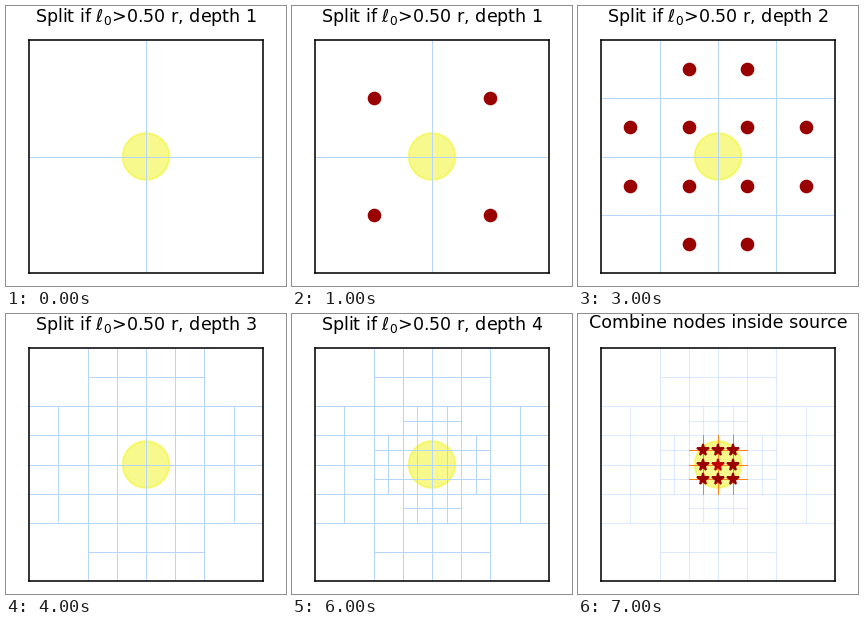
Animation, 280 px wide and 280 px high, one loop 8000 ms. Source, as a matplotlib script:

```python
import math

import matplotlib.pyplot as plt
from matplotlib.animation import FuncAnimation
from matplotlib.patches import Circle

SIZE, DPI = 280, 140
CX, CY, HALF = 140, 150.5, 350 / 3  # plot centre and half width in pixels
RATIO = 0.5
GRID, DARK, ORANGE = "#b5d5ff", "#990000", "#ff7f0e"
YELLOW = (0.94, 0.96, 0.1)

fig = plt.figure(figsize=(SIZE / DPI, SIZE / DPI), dpi=DPI, facecolor="white")
ax = fig.add_axes([(CX - HALF) / SIZE, 1 - (CY + HALF) / SIZE,
                   2 * HALF / SIZE, 2 * HALF / SIZE])
title = fig.text(0.5, 0.9, "", ha="center", va="baseline", fontsize=9)


def needs_split(cell):
    x, y, size = cell
    return size > RATIO * math.hypot(x, y)


def children(cell):
    x, y, size = cell
    q = size / 4
    return [(x + i * q, y + j * q, size / 2) for i in (-1, 1) for j in (-1, 1)]


def build_levels(depth):
    """Cells that are split at each level of the tree."""
    levels = [[(0, 0, 2)]]
    for _ in range(depth - 1):
        new = [kid for cell in levels[-1] for kid in children(cell)]
        levels.append([c for c in new if needs_split(c)])
    return levels


LEVELS = build_levels(4)


def draw_grid(depth, alpha=1):
    for level in LEVELS[:depth]:
        for x, y, size in level:
            h = size / 2
            style = dict(color=GRID, lw=0.5, alpha=alpha, solid_capstyle="butt")
            ax.plot([x - h, x + h], [y, y], **style)
            ax.plot([x, x], [y - h, y + h], **style)


def draw_combined():
    steps = (-0.125, 0, 0.125)
    for s in steps:
        ax.plot([-0.25, 0.25], [s, s], color=ORANGE, lw=0.5)
        ax.plot([s, s], [-0.25, 0.25], color=ORANGE, lw=0.5)
    for x in steps:
        for y in steps:
            ax.plot(x, y, "*", color=DARK if x or y else "#c00000")


def update(i):
    ax.clear()
    ax.set(xlim=(-1, 1), ylim=(-1, 1), xticks=[], yticks=[])
    ax.add_patch(Circle((0, 0), 0.2, color=YELLOW, alpha=0.5))
    if i == 7:
        draw_grid(4, 0.5)
        draw_combined()
        title.set_text("Combine nodes inside source")
        title.set_y(1 - 14 / SIZE)
        return
    depth = i // 2 + 1
    draw_grid(depth)
    if i % 2:
        for x, y, _ in LEVELS[depth]:
            ax.plot(x, y, "o", color=DARK)
    title.set_text(rf"Split if $\ell_0$>{RATIO:.2f} r, depth {depth}")
    title.set_y(1 - 16 / SIZE)


anim = FuncAnimation(fig, update, frames=8, interval=1000, repeat=True,
                     init_func=lambda: update(0))
plt.show()
```
